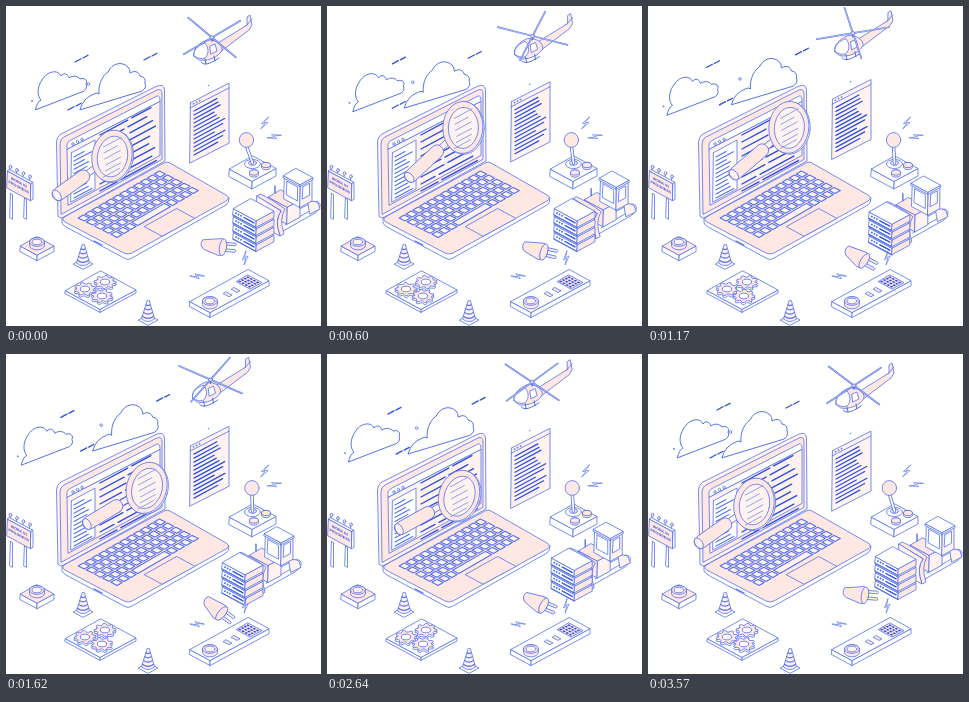
Recreate the animation shown at these times as an HTML page with a canvas. Size 315x320 px, loop 3600 ms.

```html
<!DOCTYPE html>
<html lang="en">
<head>
<meta charset="utf-8">
<title>Isometric workspace</title>
<style>
html, body { margin: 0; width: 100%; height: 100%; overflow: hidden; background: #fff; }
canvas { display: block; width: 315px; height: 320px; }
</style>
</head>
<body>
<canvas id="stage" width="315" height="320"></canvas>
<script>
const ctx = document.getElementById('stage').getContext('2d');
const LOOP = 3600, STEP = 30, TAU = Math.PI * 2, SLOPE = 0.54;
const BLUE = '#5472ec', INK = '#2d50dc', SOFT = '#8398f0';
const PINK = '#ffe7e4', PALE = '#fff3f1', WHITE = '#fff';

const rand = seed => {
  const v = Math.sin(seed * 12.9898) * 43758.5453;
  return v - Math.floor(v);
};
const mix = (a, b, u) => a.map((v, i) => v + (b[i] - v) * u);
const ease = (t, from, to) => {
  const u = Math.max(0, Math.min(1, (t - from) / (to - from)));
  return (1 - Math.cos(u * Math.PI)) / 2;
};

function paint(fill, stroke = BLUE, width = 0.8) {
  if (fill) { ctx.fillStyle = fill; ctx.fill(); }
  if (stroke) { ctx.strokeStyle = stroke; ctx.lineWidth = width; ctx.stroke(); }
}

function poly(points, fill, stroke, width) {
  ctx.beginPath();
  points.forEach(([x, y]) => ctx.lineTo(x, y));
  ctx.closePath();
  paint(fill, stroke, width);
}

function line(x1, y1, x2, y2, width = 0.8, color = BLUE) {
  ctx.beginPath();
  ctx.moveTo(x1, y1);
  ctx.lineTo(x2, y2);
  paint(null, color, width);
}

// A line running along the up-right axis.
const rise = (x, y, len, width, color) => line(x, y, x + len, y - len * SLOPE, width, color);

function oval(x, y, rx, ry, fill, turn = 0) {
  ctx.beginPath();
  ctx.ellipse(x, y, rx, ry, turn, 0, TAU);
  paint(fill);
}

function path(d, fill, stroke = BLUE, width = 0.8) {
  const p = new Path2D(d);
  if (fill) { ctx.fillStyle = fill; ctx.fill(p); }
  ctx.strokeStyle = stroke;
  ctx.lineWidth = width;
  ctx.stroke(p);
}

function at(x, y, draw) {
  ctx.save();
  ctx.translate(x, y);
  draw();
  ctx.restore();
}

// Flat tile from its left corner: a runs down-right, b runs up-right.
function tile(x, y, a, b, fill, stroke) {
  poly([[x, y], [x + a, y + a * SLOPE], [x + a + b, y + (a - b) * SLOPE], [x + b, y - b * SLOPE]], fill, stroke);
}

// Upright walls facing left (along a) and right (along b).
function wall(x, y, len, h, fill, slope = SLOPE) {
  poly([[x, y], [x + len, y + len * slope], [x + len, y + len * slope + h], [x, y + h]], fill);
}

function box(x, y, a, b, h, top = WHITE, left = WHITE, right = WHITE) {
  wall(x, y, a, h, left);
  wall(x + a, y + a * SLOPE, b, h, right, -SLOPE);
  tile(x, y, a, b, top);
}

function drum(x, y, rx, h, fill) {
  const ry = rx * 0.58;
  ctx.beginPath();
  ctx.ellipse(x, y + h, rx, ry, 0, 0, Math.PI);
  ctx.ellipse(x, y, rx, ry, 0, Math.PI, TAU);
  ctx.closePath();
  paint(fill);
  oval(x, y, rx, ry, fill);
}

function dashes(x, y) {
  rise(x, y, 6, 1.3, INK);
  rise(x + 8, y - 4, 5, 1.3, INK);
}

function clouds(e) {
  at(-14.5 * e, 7.5 * e, () => {
    path('M29.5 103.5Q31 96 35 94C31 90 31 81 36 74C41 65 52 63 55 70C58 66 62 68 63 72C67 69 72 70 74 73C79 71 82 75 80 78Q82 82 78 85Z', WHITE, INK);
    dashes(69, 56);
    oval(26, 95, 0.6, 0.6, WHITE);
  });
  at(13 * e, -7 * e, () => {
    path('M74 103.5Q77 92 88 88Q91 86 93 88C92 78 97 69 102 66C106 57 116 55 122 61Q124 63 124 67C129 64 133 66 134 70Q140 71 139 77Q141 82 136 85Z', WHITE, INK);
    dashes(62, 104);
    dashes(138, 54);
    oval(82.5, 78, 1.2, 1.4, WHITE);
  });
}

function helicopter(e, t) {
  at(-1.5 * e, -6 * e, () => {
    path('M212 37L241 19L241 11L244 9L246 19L243 24L214 46Z', PINK);
    line(240, 20, 246, 13);
    path('M188 50C186 44 193 37 201 34C209 33 217 38 216 44C213 51 201 56 193 54Z', PINK);
    path('M188 50C187 43 193 39 199 37C203 42 203 48 199 52Q194 54 188 50Z', WHITE);
    path('M204 40L209 38L211 45L205 48Z', WHITE);
    path('M195 56C198 60 204 58 213 52M199 53L200 58M208 50L209 55', null, INK);
    line(206, 35, 206, 31, 1.6);
    const spin = 0.87 + t / LOOP * TAU;
    for (let i = 0; i < 4; i++) {
      const a = spin + i * TAU / 4;
      const x = 206 + 37 * Math.cos(a), y = 31.5 + 26 * Math.sin(a);
      line(206, 31.5, x, y, 1.7);
      line(206, 31.5, x, y, 0.5, WHITE);
    }
    oval(206, 31.5, 2, 1.5, PINK);
  });
}

function documentPage(e) {
  oval(202.5, 79.5 - 5 * e, 0.3, 0.3, BLUE);
  at(0, -5 * e, () => {
    wall(184, 97, 39, 60, PALE, -0.51);
    line(184, 102, 223, 82);
    for (let i = 0; i < 3; i++) oval(187.5 + i * 3, 97.8 - i * 1.5, 0.5, 0.6, WHITE);
    for (let i = 0; i < 12; i++) rise(188, 105 + i * 4, 18 + rand(i + 4) * 13, 1.3, INK);
  });
}

function screenText() {
  for (let i = 0; i < 11; i++) rise(68, 151 + i * 4.1, 10 + rand(i) * 8, 1.1, BLUE);
  for (let i = 0; i < 9; i++) {
    const gap = 14 + rand(i + 20) * 18, end = 58 - rand(i + 40) * 12;
    const y = 129 + i * 7;
    rise(94, y, gap, 1.4, INK);
    rise(98 + gap, y - (gap + 4) * SLOPE, end - gap - 4, 1.4, INK);
  }
}

function keyboard() {
  const rows = 5, keys = 12;
  const point = (u, v) => [70.5 + 83 * u + 41 * v, 212 - 48 * u + 20.5 * v];
  for (let r = 0; r < rows; r++) {
    let u = 0;
    for (let k = 0; k < keys && u < 0.99; k++) {
      const size = (r === rows - 1 && k === 3 ? 5 : 1) / keys;
      const [u1, u2, v1, v2] = [u + 0.01, u + size - 0.012, r / rows + 0.02, (r + 1) / rows - 0.03];
      poly([point(u1, v1), point(u2, v1), point(u2, v2), point(u1, v2)], PALE, BLUE, 1.1);
      u += size;
    }
  }
}

function laptop() {
  path('M52 210L50.5 137Q50.5 131 55 128L150 80.5Q158 77 158.5 84L159 155L56 212Z', PALE);
  path('M55 208L54 138Q54 133 58 131L151 84Q156 82 156 88L156 153Z', PINK);
  path('M62 199L61 143L154 95L154 149Z', PALE);
  path('M61 143L61 138Q62 135 65 134L151 90Q154 89 154 95Z', WHITE);
  for (let i = 0; i < 3; i++) oval(67 + i * 4.5, 138 - i * 2.3, 1.2, 1.4, WHITE);
  wall(65, 147, 24, 49, WHITE, -SLOPE);
  screenText();
  path('M56 212L56 217Q57 219 60 221L118 252Q122 255 126 252L220 199Q223 197 223 192Z', WHITE);
  path('M60 210L158 157Q161 155 164 157L220 189Q225 192 220 195L126 247Q122 249 118 247L59 216Q54 213 60 210Z', PINK);
  line(88, 235, 96, 239, 1.3);
  keyboard();
  tile(138, 220.5, 18, 33, PINK);
}

function magnifier(t) {
  // Each pose: lens centre, then handle tip.
  const home = [106, 150, 50, 190], high = [141, 116.5, 87, 169], low = [140.5, 139, 78, 171];
  const raised = mix(home, high, ease(t, 0, 800));
  const lowered = mix(raised, low, ease(t, 800, 2000));
  const [x, y, tx, ty] = mix(lowered, home, ease(t, 2300, 3330));
  const dir = Math.atan2(ty - y, tx - x), length = Math.hypot(tx - x, ty - y);
  const tilt = 0.2 + (dir - 2.52) * 1.2;
  at(x, y, () => {
    ctx.save();
    ctx.rotate(dir);
    ctx.beginPath();
    ctx.roundRect(20, -3, 14, 6, 1);
    paint(PALE);
    ctx.beginPath();
    ctx.roundRect(29, -6.5, length - 26, 13, 6);
    paint(PINK);
    oval(length - 1, 0, 3.6, 6, PALE);
    ctx.restore();
    oval(1.3, 0.8, 20, 26, WHITE, tilt);
    oval(0, 0, 20, 26, PINK, tilt);
    oval(0.5, 0.5, 15, 20.5, PALE, tilt);
    for (let i = -2; i < 4; i++) rise(-9 + rand(i + 9) * 3, i * 6 + 3, 13 + rand(i + 3) * 5, 0.9, SOFT);
  });
}

function sign() {
  for (const x of [4, 18]) wall(x, 186 + x / 3, 2.5, 26 - x / 3, WHITE);
  for (let i = 0; i < 4; i++) {
    const x = 4.5 + i * 6.5, y = 161 + i * 3.2;
    line(x, y, x - 1, y + 6);
    oval(x, y, 1.4, 1.7, PINK);
  }
  tile(1, 165, 23.5, 2.5, WHITE);
  wall(24.5, 177.7, 2.5, 17, WHITE, -SLOPE);
  wall(1, 165, 23.5, 17, PINK);
  ctx.save();
  ctx.transform(1, SLOPE, 0, 1, 12.8, 177.5);
  ctx.fillStyle = INK;
  ctx.textAlign = 'center';
  ctx.font = 'bold 3.6px "Liberation Sans", sans-serif';
  ctx.fillText('WORK IN', 0, 0);
  ctx.fillText('PROGRESS', 0, 4.8);
  ctx.restore();
}

function cone(x, y) {
  tile(x - 10, y + 19, 10, 10, WHITE);
  path(`M${x - 1} ${y}L${x - 6.5} ${y + 18}Q${x} ${y + 23} ${x + 6.5} ${y + 18}L${x + 1.5} ${y}Z`, PALE);
  for (let i = 1; i < 5; i++) {
    const w = 0.8 + i * 1.2, top = y + i * 3.8;
    path(`M${x - w} ${top}Q${x} ${top + w * 0.8} ${x + w} ${top}`, null, BLUE, 1.1);
  }
}

function gear(x, y, r, turn) {
  const teeth = 8, outline = [];
  for (let i = 0; i < teeth * 4; i++) {
    const a = turn + i / (teeth * 4) * TAU, k = i % 4 < 2 ? r : r * 0.76;
    outline.push([x + k * Math.cos(a), y + k * 0.6 * Math.sin(a)]);
  }
  poly(outline.map(([px, py]) => [px, py + 2]), WHITE);
  poly(outline, PINK);
  oval(x, y, r * 0.42, r * 0.26, WHITE);
}

function gearTable(t) {
  box(59, 284.5, 35, 36, 3);
  const turn = t / LOOP * Math.PI;
  gear(99, 276, 11, turn);
  gear(79, 283, 11, 0.4 - turn);
  gear(96, 290, 11, 0.2 - turn);
}

function pushButton() {
  box(14, 240, 17, 17, 5.5, PINK);
  drum(31, 236, 7.5, 3.5, PINK);
  oval(31, 236, 5, 2.8, PALE);
}

function joystick(t) {
  const x = 240.5 + 5.5 * Math.sqrt(Math.sin(t / LOOP * Math.PI));
  box(223, 163, 23, 24, 7.5);
  oval(246.5, 158, 8, 4.6, WHITE);
  oval(246.5, 157, 4, 2.4, PINK);
  line(246.5, 157, x, 140, 3.4);
  line(246.5, 157, x, 140, 1.8, WHITE);
  drum(248, 166.5, 4.5, 2, PINK);
  drum(260, 159, 4.5, 2, PINK);
  oval(x, 134, 7.2, 7.4, PINK);
}

function bulldozer(push) {
  at(push, -push * SLOPE, () => {
    path('M277 225L309 207Q315 203 314 198Q312 194 307 196L276 212Q271 220 277 225Z', WHITE);
    path('M279 219L307 203Q311 200 309 198', null);
    path('M302 196Q308 194 312 197L314 203L304 208Z', PALE);
    box(262, 191, 19, 13, 17, PINK, PINK, PALE);
    wall(278, 171, 16, 22, WHITE);
    wall(294, 179.5, 12, 22, PALE, -SLOPE);
    wall(280.5, 175, 11, 14, WHITE);
    wall(296.5, 181, 7, 12, WHITE, -SLOPE);
    box(277, 169.5, 17, 13, 2);
    line(269, 187, 269, 180, 1.4);
    path('M251 190L254 188Q264 192 279 203Q273 213 278 228L274 230Q268 214 275 205Z', PINK);
    path('M251 190L275 205Q268 214 274 230L251 218Z', PALE);
  });
}

function servers(push) {
  at(push, -push * SLOPE, () => {
    for (let i = 3; i >= 0; i--) {
      const y = 202.5 + i * 8;
      box(227, y, 23, 18, 6.5, WHITE, WHITE, PINK);
      for (let k = 0; k < 3; k++) oval(230 + k * 2.5, y + 4.7 + k * 1.3, 0.5, 0.7, INK);
      line(238, y + 9, 248, y + 14.4, 1.4, INK);
      line(227, y + 6.5, 250, y + 19, 1.3);
    }
  });
}

function plug(e) {
  at(207 + e, 240 + 13.5 * e, () => {
    ctx.rotate(0.08 + 0.56 * e);
    for (const y of [-3.5, 3]) {
      ctx.beginPath();
      ctx.roundRect(11, y - 1.1, 12, 2.6, 1);
      paint(PALE);
    }
    path('M-11 -5Q-14 0 -9 4L6 9Q12 9 13 2Q14 -6 9 -8Z', PINK);
    oval(10, 0.5, 3.6, 8.4, PINK, 0.08);
  });
}

function controller() {
  box(183.5, 295.5, 20.5, 59, 5);
  drum(204, 295, 7.5, 3.5, PINK);
  oval(204, 295, 5, 2.9, PALE);
  for (const x of [217, 225]) tile(x, 287.5 - (x - 217) * SLOPE, 6, 3, PINK);
  tile(230, 275.5, 14, 12, PINK);
  for (let r = 0; r < 4; r++) {
    for (let c = 0; c < 4; c++) {
      tile(232 + c * 2.7 + r * 3.2, 275.5 + (r * 3.2 - c * 2.7) * SLOPE, 2, 1.7, INK, null);
    }
  }
}

function bolt(x, y, turn) {
  at(x, y, () => {
    ctx.rotate(turn);
    path('M3 -6.5L-3 1L0.5 0.5L-3 6.5L3.5 -1L0 -0.5Z', WHITE, BLUE, 0.6);
  });
}

function draw(t) {
  const swing = (1 - Math.cos(t / LOOP * TAU)) / 2;
  const push = -19.5 * swing;
  ctx.fillStyle = WHITE;
  ctx.fillRect(0, 0, 315, 320);
  clouds(swing);
  helicopter(swing, t);
  documentPage(swing);
  laptop();
  magnifier(t);
  sign();
  pushButton();
  gearTable(t);
  cone(77, 239);
  cone(142, 295);
  joystick(t);
  bulldozer(push);
  // The stack only moves once the blade has closed the gap.
  servers(Math.min(0, push + 8));
  controller();
  plug(swing);
  bolt(258.5, 117, 0.15);
  bolt(268, 130.5, 0.95);
  bolt(239, 252, -0.3);
  bolt(191, 270, 1.15);
}

ctx.lineJoin = 'round';
ctx.lineCap = 'round';
function tick() {
  draw(Math.floor(performance.now() % LOOP / STEP) * STEP);
  requestAnimationFrame(tick);
}
tick();
</script>
</body>
</html>
```
